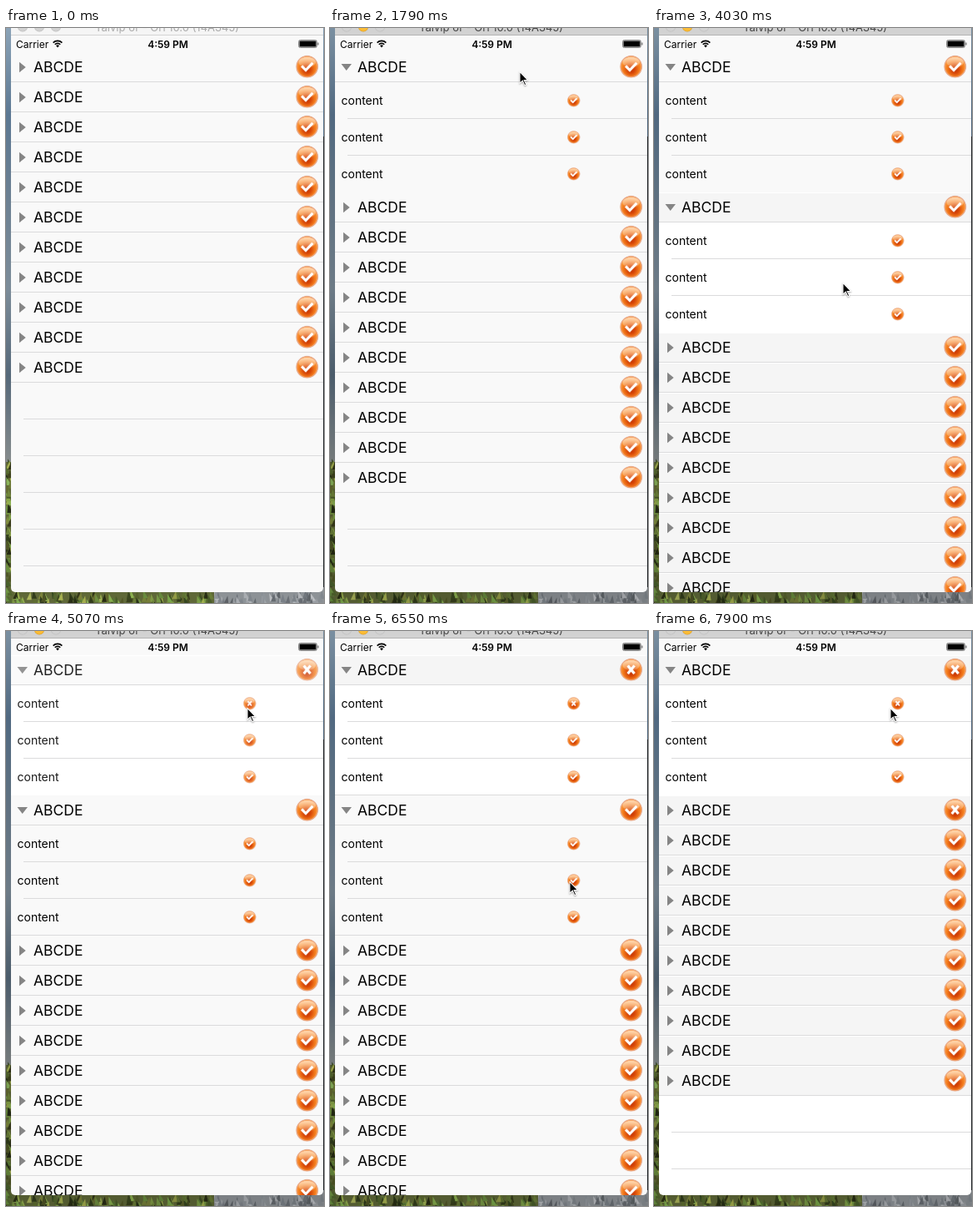
Animation of 382 by 689 pixels, one loop 8000 ms. Source, as an HTML page with a canvas:

```html
<!DOCTYPE html>
<html lang="en">
<head>
<meta charset="utf-8">
<title>Expandable list</title>
<style>
html, body { margin: 0; width: 100%; height: 100%; overflow: hidden; }
canvas { display: block; }
</style>
</head>
<body>
<canvas id="stage" width="382" height="689"></canvas>
<script>
let ctx = document.getElementById('stage').getContext('2d');
const LOOP = 8000, TICK = 149;
const LEFT = 6, RIGHT = 381, BOTTOM = 676, HEADER = 36, ROW = 44, GROUPS = 11, ROWS = 3;

// All times below are in ticks
const OPEN_FIRST = 12, OPEN_SECOND = 20, CLOSE_SECOND = 50;
const TAP = [33, 44];
// Pointer strokes: start, end, target x, target y
const MOVES = [
  [6, 10, 228, 52], [13, 17, 190, 217], [21, 23, 191, 256], [24, 27, 227, 305],
  [27, 30, 311, 150], [30, 32, 290, 92], [35, 42, 288, 300], [43, 44, 291, 309],
  [47, 49, 288, 222], [50, 53, 284, 92]
];

const clamp = v => Math.min(1, Math.max(0, v));
const isOpen = (g, k) =>
  g === 0 ? k >= OPEN_FIRST : g === 1 && k >= OPEN_SECOND && k < CLOSE_SECOND;
const isCrisp = (g, k) =>
  k >= TAP[1] || (g ? k >= OPEN_SECOND && k < TAP[0] : k >= TAP[0]);
const fadeOf = (g, k) => g < 2 && k >= TAP[g] ? clamp((k - TAP[g] + .7) / 2) : 0;

function rect(x, y, w, h, color) {
  ctx.fillStyle = color;
  ctx.fillRect(x, y, w, h);
}

function rule(x, y) {
  rect(x, y, RIGHT - x, 1, '#dbdbdc');
}

function text(str, x, y, font, color = '#000', align = 'left') {
  ctx.font = font + ' Inter, "Liberation Sans", sans-serif';
  ctx.textAlign = align;
  ctx.fillStyle = color;
  ctx.fillText(str, x, y);
}

function line(...points) {
  ctx.beginPath();
  points.forEach(([x, y]) => ctx.lineTo(x, y));
  ctx.stroke();
}

function shape(color, ...points) {
  ctx.beginPath();
  points.forEach(([x, y]) => ctx.lineTo(x, y));
  ctx.fillStyle = color;
  ctx.fill();
}

function disc(x, y, r, fill) {
  ctx.beginPath();
  ctx.arc(x, y, r, 0, 7);
  ctx.fillStyle = fill;
  ctx.fill();
}

function shade(gradient, ...colors) {
  colors.forEach((c, i) => gradient.addColorStop(i / (colors.length - 1), c));
  return gradient;
}

// Draws something once on its own canvas
function sprite(w, h, paint) {
  const canvas = document.createElement('canvas'), main = ctx;
  canvas.width = w;
  canvas.height = h;
  ctx = canvas.getContext('2d');
  paint();
  ctx = main;
  return canvas;
}

function paintBall(crossed) {
  ctx.scale(2, 2);
  ctx.translate(14, 14);
  disc(0, 0, 13.3, '#df9a78');
  disc(0, 0, 12.6, '#f3a87c');
  disc(0, 0, 11.9, shade(ctx.createRadialGradient(0, 4, 0, 0, 2, 14),
    '#c23000', '#d84808', '#f27a1c', '#ffa23e'));
  ctx.beginPath();
  ctx.ellipse(0, -5.2, 10.2, 6.2, 0, 0, 7);
  ctx.fillStyle = shade(ctx.createLinearGradient(0, -11, 0, 1),
    'rgba(255,238,220,.75)', 'rgba(255,220,190,.22)');
  ctx.fill();
  ctx.strokeStyle = '#fff';
  ctx.lineWidth = 3.2;
  if (crossed) {
    line([-4, -4.8], [4, 4.8]);
    line([-4, 4.8], [4, -4.8]);
  } else {
    line([-6.5, -.8], [-1.6, 4.2], [6.8, -4.5]);
  }
}
const BALLS = [false, true].map(crossed => sprite(56, 56, () => paintBall(crossed)));

function ball(x, y, size, crossed) {
  ctx.drawImage(BALLS[+crossed], x - size / 2, y - size / 2, size, size);
}

// Hills on the left, grass and rock along the bottom
const WALLPAPER = sprite(382, 689, () => {
  let seed = 7;
  const random = () => (seed = seed * 16807 % 2147483647) / 2147483647;
  rect(0, 0, 382, 689, shade(ctx.createLinearGradient(0, 0, 0, 520),
    '#8ba3b7', '#5c7893', '#6d8193', '#7c8c99', '#56697a', '#868c8d'));
  rect(0, 520, 250, 169, '#5f6838');
  rect(250, 660, 132, 29, '#8d9296');
  rect(RIGHT, 130, 1, 540, '#2b2f33');
  for (let i = 0; i < 260; i++) {
    const side = i % 4 === 0, x = side ? random() * 6 : random() * 382;
    const y = side ? 520 + random() * 160 : 680 + random() * 12;
    const tone = random();
    const color = x < 250
      ? `hsl(${65 + 25 * tone}, 38%, ${12 + 42 * random()}%)`
      : `hsl(210, 5%, ${38 + 36 * tone}%)`;
    shape(color, [x - 3, y + 3], [x + 2 - 6 * tone, y - 7], [x + 3, y + 3]);
  }
});

function titleBar(active) {
  rect(LEFT, 0, RIGHT - LEFT, 9, active ? '#d2d2d2' : '#f5f5f5');
  rect(LEFT, 8, RIGHT - LEFT, 1, active ? '#b4b4b4' : '#d4d4d4');
  [20, 40, 60].forEach((x, i) => {
    const lit = active && i === 1;
    disc(x, -1.5, 6, lit ? '#dc9f28' : '#bdbdbd');
    disc(x, -1.5, 5.3, lit ? '#fbbc36' : '#d2d2d2');
  });
  text('Talvip 6r - Orl 10.0 (14A345)', 193.5, 3.5, '13px', active ? '#444' : '#aaa', 'center');
}

function statusBar() {
  rect(LEFT, 9, RIGHT - LEFT, 20, '#f9f9f9');
  text('Carrier', 12, 23.5, '12px');
  text('4:59 PM', 194.5, 23.5, '600 12px', '#000', 'center');
  ctx.strokeStyle = '#000';
  ctx.lineWidth = 1.6;
  [4.6, 7.6].forEach(r => {
    ctx.beginPath();
    ctx.arc(62, 23, r, -Math.PI * .75, -Math.PI * .25);
    ctx.stroke();
  });
  shape('#000', [62, 23.5], [60, 21], [62, 20.2], [64, 21]);
  ctx.strokeStyle = '#8a8a8a';
  ctx.lineWidth = 1;
  ctx.beginPath();
  ctx.roundRect(351.5, 14.5, 22, 9, 2);
  ctx.stroke();
  rect(352.5, 15.5, 20, 7, '#000');
  rect(374.5, 17.5, 1, 3, '#555');
}

function rows(g, y, crossed, alpha) {
  ctx.globalAlpha = alpha;
  for (let i = 0; i < ROWS; i++) {
    const mid = y + HEADER + ROW * (i + .5);
    text('content', 13.5, mid + 5, '14px');
    ball(292.7, mid - .2, 15.8, crossed && i === g);
  }
  ctx.globalAlpha = 1;
}

function header(y, open, crossed, alpha) {
  const mid = y + 18;
  ctx.globalAlpha = alpha;
  if (open) shape('#858585', [13.5, mid - 4], [26, mid - 4], [19.7, mid + 4]);
  else shape('#858585', [16, mid - 6.2], [16, mid + 6.2], [23.7, mid]);
  text('ABCDE', 33, mid + 6, '17.5px');
  ctx.globalAlpha = alpha * alpha;
  ball(361.7, mid - .7, 28, crossed);
  ctx.globalAlpha = 1;
}

function list(k) {
  let y = 29;
  for (let g = 0; g < GROUPS; g++) {
    const open = isOpen(g, k), crisp = isCrisp(g, k), fade = fadeOf(g, k);
    const height = HEADER + (open ? ROWS * ROW : 0);
    const alpha = 1 - fade * (1 - fade);
    rect(LEFT, y, RIGHT - LEFT, height, crisp ? '#fff' : '#f9f9f9');
    if (crisp) rect(LEFT, y + 1, RIGHT - LEFT, HEADER - 1, alpha < 1 ? '#fafafa' : '#f5f5f5');
    rule(LEFT, y + HEADER - 1);
    if (open) {
      for (let i = 1; i < ROWS; i++) rule(21, y + HEADER + i * ROW - 1);
      if (k >= TAP[0] + 2 - 2 * g && k < (g ? TAP[1] : CLOSE_SECOND)) rule(LEFT, y + height - 1);
      if (fade < 1) rows(g, y, false, 1 - fade);
      if (fade > 0) rows(g, y, true, fade);
    }
    header(y, open, fade > .5, alpha);
    y += height;
  }
  rect(LEFT, y, RIGHT - LEFT, Math.max(0, BOTTOM - y), isCrisp(GROUPS, k) ? '#fff' : '#f9f9f9');
  for (y += ROW; y < BOTTOM; y += ROW) rule(21, y - 1);
}

function pointer(k) {
  if (k < 7) return;
  let x = 325, y = 136;
  for (const [start, end, toX, toY] of MOVES) {
    const p = clamp((k - start) / (end - start));
    x += (toX - x) * p;
    y += (toY - y) * p;
  }
  ctx.save();
  ctx.translate(x - .5, y - .7);
  ctx.shadowColor = 'rgba(0,0,0,.35)';
  ctx.shadowBlur = 2;
  ctx.shadowOffsetY = 1;
  shape('#fff', [0, 0], [0, 16], [3.7, 12.6], [6.2, 18], [8.8, 17], [6.4, 11.6], [11.2, 11.6]);
  ctx.shadowColor = 'transparent';
  shape('#000', [1, 2.4], [1, 13.7], [4, 10.9], [6.6, 16.6], [7.5, 16.2], [4.9, 10.6], [8.9, 10.6]);
  ctx.restore();
}

function draw(now) {
  const k = Math.floor(now % LOOP / TICK), active = k >= OPEN_FIRST;
  ctx.imageSmoothingQuality = 'high';
  ctx.drawImage(WALLPAPER, 0, 0);
  if (active) rect(0, 0, 382, 689, 'rgba(0,0,0,.12)');
  ctx.save();
  ctx.beginPath();
  ctx.roundRect(LEFT, -9, RIGHT - LEFT, BOTTOM + 9, 5);
  ctx.clip();
  titleBar(active);
  statusBar();
  list(k);
  ctx.restore();
  pointer(k);
  requestAnimationFrame(draw);
}
requestAnimationFrame(draw);
</script>
</body>
</html>
```
